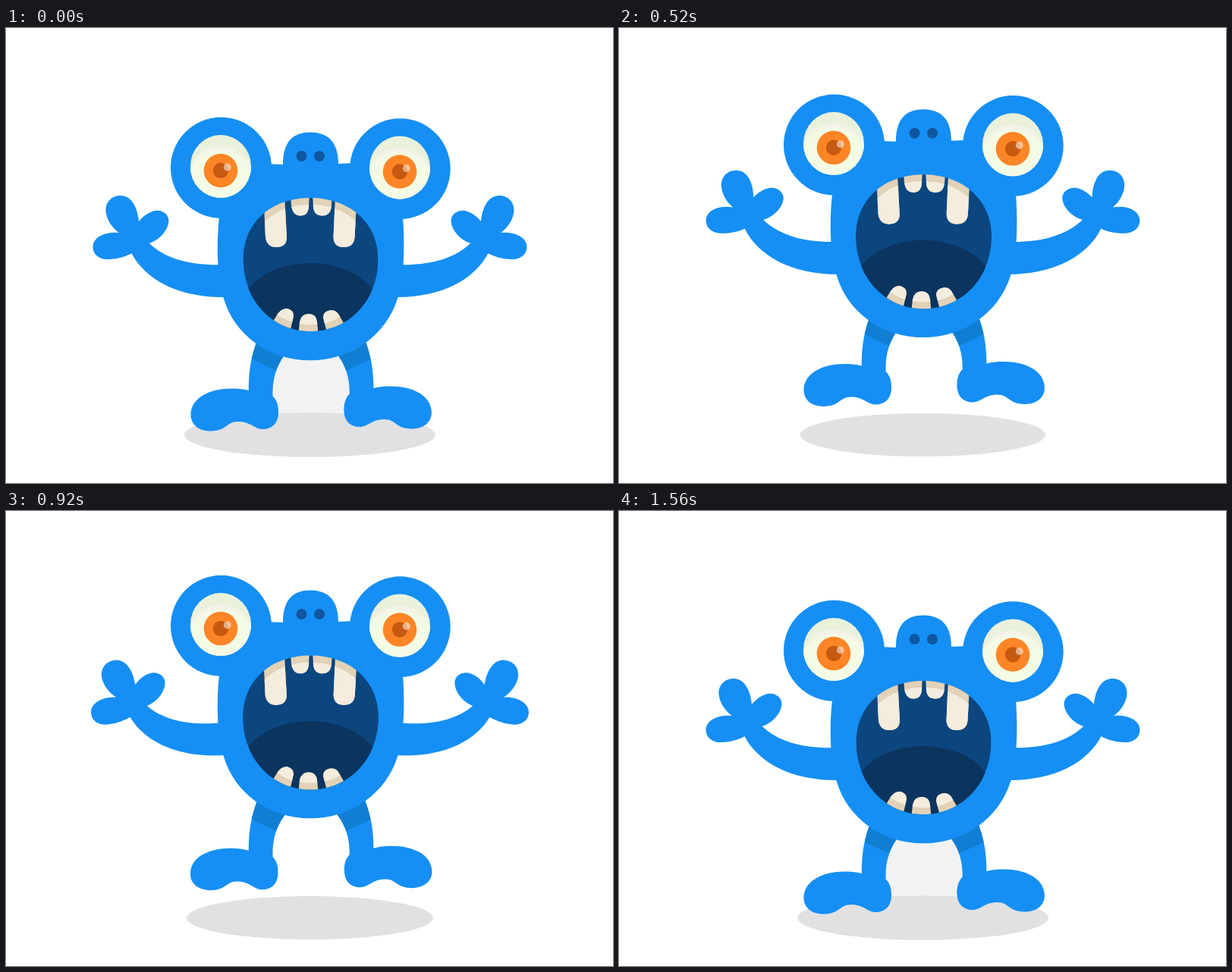
These frames come from a looping animation (800 by 600 pixels, 2040 ms). An HTML page with a canvas:

```html
<!DOCTYPE html>
<html lang="en">
<head>
<meta charset="utf-8">
<title>Jumping monster</title>
<style>
  html, body { margin: 0; width: 100%; height: 100%; overflow: hidden; background: #fff; }
  canvas { display: block; width: 100vw; height: 100vh; }
</style>
</head>
<body>
<canvas id="stage" width="800" height="600"></canvas>
<script>
const ctx = document.getElementById('stage').getContext('2d');
const LOOP = 2040, STEP = 40;
const BLUE = '#158ff5', GAP = '#f2f2f2';

const arm = new Path2D(`M310 312 L290 312 C245 314 210 305 188 283 L170 270 L160 286
  L165 296 C183 332 228 356 290 355 L310 355 Z`);
const hand = new Path2D(`M188 284 C200 281 214 268 214.5 254 C214 244 204 239.5 196 241
  C187 243 180 249 175 255 C174 242 168 221 151 221 C138 221 131 231 131.5 241
  C132 252 140 264 149 270 C134 268 114.5 274 114.5 289 C115 301 126 306 137 305
  C150 304 158 301 166 297 Z`);
const leg = new Path2D('M338 395 C325 425 319 445 320 485 L352 492 C350 465 355 445 372 425 Z');
const legShade = new Path2D('M310 430 L365 456 L400 380 L310 380 Z');
const foot = new Path2D(`M297 475.5 C305 475.5 313 476 320 478 L352 486 C358 492 359 500 359 507
  C359 521 351 529 338 529 C328 529 322 519 306 519 C290 519 292 531 270 531.5
  C254 531.5 243.5 523 243.5 510 C243.5 488 268 475.5 297 475.5 Z`);
const head = new Path2D(`M281 250 C277.5 280 277.5 330 287 357 C301 405 347 438.3 401 438.3
  C455 438.3 501 405 516 357 C525.5 330 525.5 280 523 250 L460 178 L438 179
  C438 148 422 137.5 401 137.5 C380 137.5 365 148 365 180 L340 179 Z`);
const mouth = new Path2D(`M401 224 C351 224 312.5 255 312.5 305 C312.5 359 351 400 401 400
  C452 400 490.5 359 490.5 305 C490.5 255 451 224 401 224 Z`);
const teeth = new Path2D(`M340 235 L342 276 Q344 289 356 289 Q370 289 370 276 L367 220 Z
  M375 218 L376 234 Q378 247.5 388 247.5 Q398 247.5 399 236 L400 218 Z
  M404 218 L405 236 Q406 247.5 417 247.5 Q428 247.5 429 234 L430 218 Z
  M434 220 L431.5 276 Q432 289 445 289 Q458.5 289 459.5 276 L462 232 Z
  M350 390 L358 377 Q364 369 371 370 Q379 372 379 380 L374 402 Z
  M385.5 402 L387 388 Q389 377 399 377 Q409 377 410 388 L411.5 402 Z
  M423 402 L418 382 Q418 374 426 372.5 Q434 371 438 377 L448 394 Z`);

// Smooth curve through [time, value] keys, level at turning points.
function track(...keys) {
  const rate = i => (keys[i + 1][1] - keys[i][1]) / (keys[i + 1][0] - keys[i][0]);
  const slope = keys.map((_, i) => {
    if (i === 0 || i === keys.length - 1) return 0;
    const a = rate(i - 1), b = rate(i);
    return a * b <= 0 ? 0 : 2 * a * b / (a + b);
  });
  return t => {
    if (t <= keys[0][0]) return keys[0][1];
    const i = keys.findIndex(k => k[0] >= t) - 1;
    if (i < 0) return keys[keys.length - 1][1];
    const [t0, v0] = keys[i], [t1, v1] = keys[i + 1];
    const d = t1 - t0, u = (t - t0) / d, u2 = u * u, u3 = u2 * u;
    return v0 + (v1 - v0) * (3 * u2 - 2 * u3)
      + d * (slope[i] * (u3 - 2 * u2 + u) + slope[i + 1] * (u3 - u2));
  };
}

const bodyY = track([40, 0], [160, 10], [240, 13], [400, 13], [440, 6], [480, -10], [520, -30.2],
  [640, -80], [760, -99], [840, -85.2], [960, -7], [1000, 7], [1040, 13], [1280, 0]);
const feetY = track([440, 0], [480, -12], [520, -32.5], [640, -80], [760, -99], [840, -85.2],
  [960, -7], [1000, 0]);
const armTurn = track([40, 0], [160, 4.6], [240, 6], [400, 6], [520, 0.8], [700, -8.5], [800, -11],
  [840, -10.2], [960, 1], [1040, 12], [1280, 0]);
const handTurn = track([400, 0], [520, 3], [680, 0]);
const footTurn = track([540, 0], [760, 5], [840, 5], [960, 0]);

function fill(path, color) {
  ctx.fillStyle = color;
  ctx.fill(path);
}

function oval(x, y, rx, ry, color) {
  ctx.beginPath();
  ctx.ellipse(x, y, rx, ry, 0, 0, Math.PI * 2);
  ctx.fillStyle = color;
  ctx.fill();
}

function group(draw) {
  ctx.save();
  draw();
  ctx.restore();
}

function about(x, y, change) {
  ctx.translate(x, y);
  change();
  ctx.translate(-x, -y);
}

const turn = (x, y, deg) => about(x, y, () => ctx.rotate(deg * Math.PI / 180));
const zoom = (x, y, sx, sy) => about(x, y, () => ctx.scale(sx, sy));

// Draws a part on the left, then mirrored on the right.
function pair(axis, draw) {
  group(() => draw(0));
  group(() => {
    zoom(axis, 0, -1, 1);
    draw(1);
  });
}

function drawArm(lift, wave) {
  turn(285, 334, lift);
  fill(arm, BLUE);
  turn(174, 278, wave);
  fill(hand, BLUE);
}

function drawLeg(right, tilt) {
  fill(leg, BLUE);
  group(() => {
    ctx.clip(leg);
    fill(legShade, '#107fd3');
  });
  ctx.translate(0, right * -3);
  turn(340, 485, tilt);
  fill(foot, BLUE);
}

function drawEye(open) {
  zoom(283, 184, 1, open);
  ctx.beginPath();
  ctx.ellipse(283, 182.5, 40, 41.5, 0, 0, Math.PI * 2);
  ctx.clip();
  ctx.fillStyle = '#e9f1da';
  ctx.fillRect(240, 138, 86, 90);
  oval(283, 196, 42, 40, '#f4f3e8');
  oval(283, 203, 44, 41, '#f4fbe4');
  oval(283, 188, 22.3, 22.3, '#fd8526');
  oval(283, 188, 10.2, 10.2, '#c65a11');
  oval(291.8, 183.5, 5, 5, 'rgba(255,255,255,.5)');
}

function drawMouth(size) {
  zoom(401, 312, size, size);
  ctx.clip(mouth);
  fill(mouth, '#0c467f');
  oval(401, 370, 90, 60, '#0b345f');
  fill(teeth, '#e1d2b8');
  const inner = new Path2D();
  inner.addPath(mouth, new DOMMatrix([0.9, 0, 0, 0.9, 40.1, 31.2]));
  ctx.clip(inner);
  fill(teeth, '#f4ecdc');
}

function draw(t) {
  const by = bodyY(t), fy = feetY(t), lift = armTurn(t), wave = handTurn(t), tilt = footTurn(t);
  const shrink = 0.124 * Math.pow(Math.max(0, -fy) / 85, 1.8);
  const open = t >= 1480 && t < 1560 ? 0.1 : 1;

  ctx.fillStyle = '#fff';
  ctx.fillRect(0, 0, 800, 600);

  // Background pockets closed off by the limbs are slightly grey.
  ctx.fillStyle = GAP;
  if (fy > -18) ctx.fillRect(342, 420, 120, 95);
  if (lift > 11) {
    fill(new Path2D('M515 250 L568 242 L600 272 L560 315 L515 325 Z'), GAP);
  }
  oval(400.5, 536.5, 165.5 * (1 - shrink), 29.2 * (1 - shrink), '#e1e1e1');

  group(() => {
    ctx.translate(0, fy);
    pair(402.2, right => drawLeg(right, tilt));
  });

  group(() => {
    ctx.translate(0, by);
    pair(400.5, () => drawArm(lift, wave));
    oval(283.5, 184.3, 66.5, 66.5, BLUE);
    oval(519.4, 185.6, 66.3, 66.3, BLUE);
    fill(head, BLUE);
    oval(389.5, 169, 7, 7, '#0f579f');
    oval(413, 169, 7, 7, '#0f579f');
    group(() => drawEye(open));
    group(() => {
      ctx.translate(236, 1.5);
      drawEye(open);
    });
    group(() => drawMouth(1 + 0.28 * shrink));
  });
}

const start = performance.now();
function tick() {
  const t = (performance.now() - start) % LOOP;
  draw(Math.floor(t / STEP) * STEP);
  requestAnimationFrame(tick);
}
tick();
</script>
</body>
</html>
```
